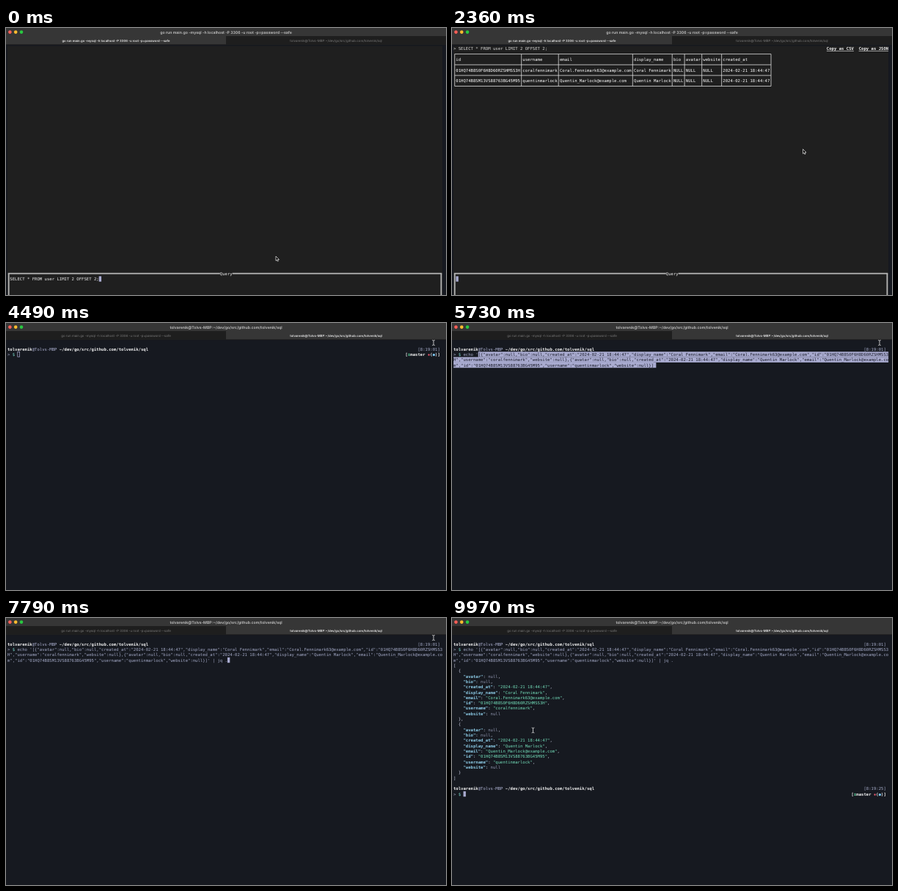
Recreate the animation shown at these times as an HTML page with a canvas. Size 600x365 px, loop 10000 ms.

```html
<!DOCTYPE html>
<html lang="en">
<head>
<meta charset="utf-8">
<title>SQL client and terminal</title>
<style>
  html, body { margin: 0; width: 100%; height: 100%; overflow: hidden; background: #161920; }
  canvas { display: block; width: 600px; height: 365px; }
</style>
</head>
<body>
<canvas id="stage" width="600" height="365"></canvas>
<script>
const ctx = document.getElementById('stage').getContext('2d');
const LOOP = 10000, COLS = 176, CW = 3.37, RH = 7.32, LEFT = 2, TOP = 24.6;
const MONO = '"DejaVu Sans Mono", "Noto Sans Mono", monospace';
const SANS = 'Inter, Roboto, sans-serif';
const LILAC = '#a9abd0', GREY = '#a3a9c6', WHITE = '#f0f0f0', NAVY = '#161920';

const QUERY = 'SELECT * FROM user LIMIT 2 OFFSET 2;';
const RUN = 'go run main.go -mysql -h localhost -P 3306 -u root -p=password --safe';
const USER = 'tolvarenik', HOST = '@Tolvs-MBP', DIR = '~/dev/go/src/github.com/tolvenik/sql';
const SHELL = USER + HOST + ':' + DIR;

const user = (name, email, id) => ({
  avatar: null, bio: null, created_at: '2024-02-21 18:44:47', display_name: name,
  email: email + '@example.com', id, username: name.toLowerCase().replace(' ', ''), website: null
});
const users = [
  user('Coral Fennimark', 'Coral.Fennimark63', '01HQ74B8S0F6H8D60RZSHMSS3H'),
  user('Quentin Marlock', 'Quentin_Marlock', '01HQ74B8SM13VS88763BG45M95')
];
const FIELDS = ['id', 'username', 'email', 'display_name', 'bio', 'avatar', 'website', 'created_at'];
const PASTE = JSON.stringify(users);
const PRETTY = JSON.stringify(users, null, 2).split('\n');

const HEAD = "echo '", HEAD_AT = [4880, 5030, 5130, 5220, 5320, 5420];
const TAIL = "' | jq .", TAIL_AT = [6480, 6640, 6820, 7000, 7200, 7360, 7550, 7700];
const RESULT = 970, CLICK = 3000, SWITCH = 4490, PASTED = 5580, ENTER = 7970;

const colX = c => LEFT + c * CW;
const rowY = r => TOP + r * RH;
const midX = c => colX(c + 0.5);
const midY = r => rowY(r + 0.5);
const typed = (s, at, t) => s.slice(0, at.filter(a => a <= t).length);

function rect(x, y, w, h, color) {
  ctx.fillStyle = color;
  ctx.fillRect(x, y, w, h);
}

function line(x1, y1, x2, y2, width, color) {
  ctx.strokeStyle = color;
  ctx.lineWidth = width;
  ctx.beginPath();
  ctx.moveTo(x1, y1);
  ctx.lineTo(x2, y2);
  ctx.stroke();
}

// Writes on the character grid and returns the next free column.
function put(row, col, text, color, bold) {
  ctx.font = (bold ? 'bold ' : '') + '5.6px ' + MONO;
  ctx.textAlign = 'left';
  ctx.fillStyle = color;
  for (const ch of text) {
    if (ch !== ' ') ctx.fillText(ch, colX(col), rowY(row) + 5.7);
    col++;
  }
  return col;
}

function label(text, x, y, size, weight, color) {
  ctx.font = `${weight} ${size}px ${SANS}`;
  ctx.textAlign = 'center';
  ctx.fillStyle = color;
  ctx.fillText(text, x, y);
}

function block(row, col) {
  rect(colX(col), rowY(row), CW, RH, LILAC);
}

function windowBar(second) {
  rect(0, 0, 600, 23, '#363636');
  rect(second ? 0 : 300, 11, 300, 11.5, '#1e1e1e');
  rect(0, 22.5, 600, 0.7, '#141414');
  ['#ff5f57', '#febc2e', '#28c840'].forEach((color, i) => {
    ctx.fillStyle = color;
    ctx.beginPath();
    ctx.arc(5.4 + i * 7.8, 5.6, 2.3, 0, 7);
    ctx.fill();
  });
  label(second ? SHELL : RUN, 300, 7.5, 5.2, 600, '#c4c4c4');
  [RUN, SHELL].forEach((text, i) => {
    const on = i === +second;
    label(text, 150 + i * 300, 18.5, on ? 4.26 : 4.4, on ? 600 : 400, on ? '#e8e8e8' : '#7c7c7c');
  });
}

function table() {
  const cells = [FIELDS, ...users.map(u => FIELDS.map(f => u[f] ?? 'NULL'))];
  const edges = [0];
  FIELDS.forEach((f, i) => edges.push(edges[i] + 1 + Math.max(...cells.map(row => row[i].length))));
  cells.forEach((row, r) => row.forEach((text, i) => put(2 + r * 2, edges[i] + 1, text, '#fff')));
  const end = edges[edges.length - 1];
  for (const c of edges) line(midX(c), midY(1), midX(c), midY(7), 0.8, '#dcdcdc');
  for (let r = 1; r < 8; r += 2) line(midX(0), midY(r), midX(end), midY(r), 0.8, '#dcdcdc');
}

function button(text, col, color) {
  const end = put(0, col, text, color, true);
  line(colX(col), rowY(0) + 6.9, colX(end), rowY(0) + 6.9, 0.6, color);
}

function client(t) {
  rect(LEFT, TOP, COLS * CW, 365 - TOP, '#1f1f1f');
  const focused = t < CLICK, done = t >= RESULT;
  const width = focused ? 1.8 : 0.8, color = focused ? '#b8b8b8' : '#d8d8d8';
  const y = midY(42), l = midX(0), r = midX(COLS - 1);
  line(l - width / 2, y, colX(86), y, width, color);
  line(colX(91), y, r + width / 2, y, width, color);
  line(l, y, l, 365, width, color);
  line(r, y, r, 365, width, color);
  put(42, 86, 'Query', WHITE);
  if (!done) put(43, 1, QUERY, WHITE);
  if (focused) block(43, done ? 1 : 1 + QUERY.length);
  if (done) {
    put(0, 0, '> ' + QUERY, '#d8d8d8');
    button('Copy as CSV', 151, WHITE);
    button('Copy as JSON', 164, focused ? WHITE : '#8cc4ec');
    table();
  }
}

function prompt(row, time, git) {
  let c = put(row, 0, USER, WHITE, true);
  c = put(row, c, HOST, '#b0b4d4');
  put(row, c + 1, DIR, WHITE, true);
  put(row, 166, time, GREY);
  put(row + 1, 0, '>', GREY);
  put(row + 1, 2, '$', '#7ce0d0');
  if (!git) return;
  const parts = [['[', WHITE], ['±', '#5fd7a0'], ['master ', WHITE], ['✹', '#ee5a70'],
    ['(', WHITE], ['●', '#7cc4f0'], [')]', WHITE]];
  c = 161;
  for (const [text, color] of parts) c = put(row + 1, c, text, color, true);
}

function command(t) {
  const pasted = t >= PASTED;
  const text = typed(HEAD, HEAD_AT, t) + (pasted ? PASTE : '') + typed(TAIL, TAIL_AT, t);
  const marked = pasted && t < TAIL_AT[0];
  const start = 4, end = start + text.length, from = start + HEAD.length;
  const row = i => 2 + Math.floor(i / COLS);
  if (marked) {
    for (let r = 2; r <= row(end); r++) {
      const a = r === 2 ? from : 0, b = r === row(end) ? end % COLS : COLS;
      rect(colX(a), rowY(r), (b - a) * CW, RH + 0.05, LILAC);
    }
  }
  [...text].forEach((ch, i) => {
    const p = start + i;
    put(row(p), p % COLS, ch, marked && p >= from ? '#1b1d2a' : GREY);
  });
  if (t >= ENTER) return;
  if (t < 4610) {
    ctx.strokeStyle = LILAC;
    ctx.lineWidth = 0.7;
    ctx.strokeRect(colX(end) + 0.3, rowY(2) + 0.4, CW - 0.5, RH - 0.8);
  } else block(row(end), end % COLS);
}

function output() {
  PRETTY.forEach((text, i) => {
    const m = text.match(/^( +)("\w+")(: )(.+?)(,?)$/);
    if (!m) return put(5 + i, 0, text, '#c8cce0');
    let c = put(5 + i, m[1].length, m[2], '#8ccbe6', true);
    c = put(5 + i, c, m[3], '#c8cce0');
    c = put(5 + i, c, m[4], m[4] === 'null' ? '#8f95ae' : '#72dcb8');
    put(5 + i, c, m[5], '#c8cce0');
  });
  prompt(28, '[8:19:25]', true);
  block(29, 4);
}

function shell(t) {
  prompt(1, '[8:19:01]', t < PASTED);
  command(t);
  if (t >= ENTER) output();
}

const PATH = [[240, 368, 312], [640, 345, 343], [1820, 345, 343], [2820, 583, 27],
  [9000, 583, 27], [9900, 110.5, 153.5]];

function pointerAt(t) {
  const i = PATH.findIndex(p => p[0] > t);
  if (i < 1) return (i ? PATH[PATH.length - 1] : PATH[0]).slice(1);
  const [t0, x0, y0] = PATH[i - 1], [t1, x1, y1] = PATH[i];
  const u = (t - t0) / (t1 - t0), e = u * u * (3 - 2 * u);
  return [x0 + (x1 - x0) * e, y0 + (y1 - y0) * e];
}

function pointer(t) {
  const [x, y] = pointerAt(t);
  ctx.save();
  ctx.translate(x, y);
  if (t < SWITCH) {
    const shape = new Path2D('M0 0V6.2L1.4 4.9L2.3 7L3.4 6.5L2.5 4.5H4.4Z');
    ctx.fillStyle = '#000';
    ctx.strokeStyle = '#f4f4f4';
    ctx.lineWidth = 0.7;
    ctx.fill(shape);
    ctx.stroke(shape);
  } else {
    ctx.strokeStyle = '#e4e4e4';
    ctx.lineWidth = 0.8;
    ctx.stroke(new Path2D('M-1.8 -3.5Q0 -3.5 0 -2.4Q0 -3.5 1.8 -3.5M0 -2.4V2.4M-1.8 3.5Q0 3.5 0 2.4Q0 3.5 1.8 3.5'));
  }
  ctx.restore();
}

function draw(now) {
  const t = now % LOOP, second = t >= SWITCH;
  ctx.textRendering = 'geometricPrecision';
  rect(0, 0, 600, 365, NAVY);
  windowBar(second);
  (second ? shell : client)(t);
  pointer(t);
}

const begin = performance.now();
function tick() {
  draw(performance.now() - begin);
  requestAnimationFrame(tick);
}
tick();
</script>
</body>
</html>
```
